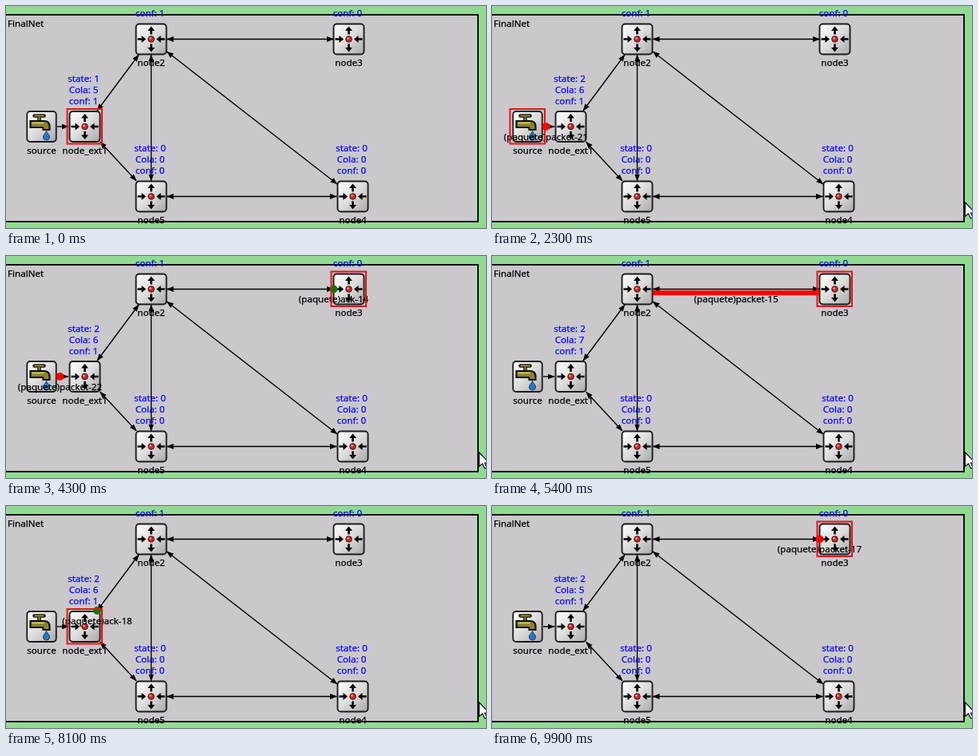
Recreate the animation shown at these times as an HTML page. Size 600 by 278 pixels, loop 10 s.

```html
<!DOCTYPE html>
<html lang="es">
<head>
<meta charset="utf-8">
<style>
  html, body { margin: 0; width: 100%; height: 100%; overflow: hidden; background: #92da92; }
  svg { display: block; width: 600px; height: 278px; }
  text { font: 11.6px "Noto Sans", "Open Sans", sans-serif; stroke: #000; stroke-width: .25; }
  .mid { text-anchor: middle; }
  .info { fill: #0a0aee; stroke: #0a0aee; }
  .wire { stroke: #000; stroke-width: 1.35; }
</style>
</head>
<body>
<svg viewBox="0 0 600 278">
  <defs>
    <linearGradient id="metal" x2="1" y2="1">
      <stop stop-color="#fff"/><stop offset=".5" stop-color="#dddcdc"/><stop offset="1" stop-color="#aaa8a8"/>
    </linearGradient>
    <marker id="tip" markerWidth="10" markerHeight="8" refX="8.5" refY="4" orient="auto-start-reverse" markerUnits="userSpaceOnUse">
      <path d="M0 .6L9 4L0 7.400z"/>
    </marker>
    <rect id="tile" x="-19" y="-19" width="38" height="38" rx="4" fill="url(#metal)" stroke="#1c1c1c" stroke-width="1.900"/>
    <g id="router">
      <use href="#tile"/>
      <path id="out" d="M-1.300 -6V-10.500H-4.500L0 -16L4.500 -10.500H1.300V-6z"/>
      <use href="#out" transform="scale(1 -1)"/>
      <path id="in" d="M-17 -1.300H-12V-4.500L-6.500 0L-12 4.500V1.300H-17z"/>
      <use href="#in" transform="scale(-1 1)"/>
      <circle r="3.800" fill="#c82828" stroke="#401010"/>
      <circle cx="-1" cy="-1" r="1.300" fill="#f5a0a0"/>
    </g>
    <g id="tap">
      <use href="#tile" transform="scale(.96 1)"/>
      <path d="M-9 -13.500H3M-3 -13V-6" stroke="#111" stroke-width="4.500" stroke-linecap="round"/>
      <path d="M-9 -13.500H3M-3 -12V-6" stroke="#9a9030" stroke-width="1.800"/>
      <path d="M-14 -7H3Q10 -7 10 0V4H2V2Q2 1 0 1H-14z" fill="#8d8428" stroke="#111" stroke-width="2.200"/>
      <path d="M-12 -4.500H3" stroke="#d8cf70" stroke-width="1.500"/>
      <path d="M6 5.500C7 9 10 10 10 13A4 4 0 0 1 2 13C2 10 5 9 6 5.500z" fill="#2878c8" stroke="#123c70"/>
    </g>
  </defs>
  <rect x="-4" y="11" width="594" height="259" fill="#cbc8cc" stroke="#111" stroke-width="2"/>
  <text x="2" y="26">FinalNet</text>
  <g id="net"></g>
  <g id="messages"></g>
  <rect id="focus" width="43.5" height="43.5" fill="none" stroke="#f01010" stroke-width="2"/>
  <path id="cursor" d="M591.500 246V263.500L595.500 260L598.500 266L601 265L598.500 259H604z" fill="#fff" stroke="#111" stroke-width="1.200"/>
</svg>
<script>
const $ = id => document.getElementById(id);

const nodes = {
  S: { x: 44.5, y: 151, name: 'source' },
  E: { x: 98.5, y: 151, name: 'node_ext1' },
  2: { x: 181.5, y: 41.5, name: 'node2', conf: 1 },
  3: { x: 428.5, y: 41.5, name: 'node3', conf: 0 },
  4: { x: 433.5, y: 238.5, name: 'node4', conf: 0 },
  5: { x: 181.5, y: 238.5, name: 'node5', conf: 0 },
};
const links = {
  SE: [64, 151, 78, 151],
  E2: [114, 131, 166, 61],
  E5: [117.5, 170, 163, 219],
  23: [201, 41.5, 409.5, 41.5],
  25: [181.5, 61, 181.5, 219],
  24: [201, 57, 414, 223],
  54: [201, 238.5, 413.5, 238.5],
};

// start tick (100 ms each), link, kind, number; acks run the link backwards
const legs = [
  [3, 'E2', 'packet', 16], [3, 'SE', 'packet', 20], [8, '23', 'ack', 13],
  [15, '23', 'packet', 14], [22, 'SE', 'packet', 21], [28, 'E2', 'ack', 16],
  [35, 'E2', 'packet', 17], [42, 'SE', 'packet', 22], [43, '23', 'ack', 14],
  [50, '23', 'packet', 15], [57, 'E2', 'ack', 17], [60, '23', 'ack', 15],
  [66, 'E2', 'packet', 18], [72, '23', 'packet', 16], [75, 'E2', 'ack', 18],
  [82, 'E2', 'packet', 19], [86, '23', 'ack', 16], [93, '23', 'packet', 17],
].map(([start, link, kind, id]) => {
  const back = kind === 'ack', [x1, y1, x2, y2] = links[link];
  return {
    start, link, kind, id,
    ends: back ? [x2, y2, x1, y1] : [x1, y1, x2, y2],
    from: link[back ? 1 : 0], to: link[back ? 0 : 1],
    length: link === 'SE' ? 5 : 7,
  };
});

const label = (x, y, s, extra = '') => `<text class="mid ${extra}" x="${x}" y="${y}">${s}</text>`;

function status({ x, y }, lines, id = '') {
  return `<g id="${id}">` + lines.map((s, i) =>
    label(x - 1.5, y - 28.5 - 14 * (lines.length - 1 - i), s, 'info')).join('') + '</g>';
}

function drawNet() {
  let out = '';
  for (const [key, n] of Object.entries(nodes)) {
    out += `<use href="#${key === 'S' ? 'tap' : 'router'}" x="${n.x}" y="${n.y}"/>` + label(n.x, n.y + 33.5, n.name);
    if (key === 'E') out += status(n, ['', '', ''], 'queue');
    else if (n.conf !== undefined)
      out += status(n, [...(n.y > 100 ? ['state: 0', 'Cola: 0'] : []), 'conf: ' + n.conf]);
  }
  for (const [key, [x1, y1, x2, y2]] of Object.entries(links))
    out += `<line class="wire" x1="${x1}" y1="${y1}" x2="${x2}" y2="${y2}" marker-end="url(#tip)"` +
      (key === 'SE' ? '/>' : ' marker-start="url(#tip)"/>');
  $('net').innerHTML = out;
}

function drawMessage({ ends: [x1, y1, x2, y2], kind, id, link }, age) {
  const color = kind === 'ack' ? '#0c780c' : '#f00';
  const dx = x2 - x1, dy = y2 - y1;
  const sending = link !== 'SE' && (age === 4 || age === 5);
  const p = sending ? 0.5 : Math.min(age / 4, 1);
  const x = x1 + dx * p, y = y1 + dy * p;
  let shape = `<circle cx="${x}" cy="${y}" r="5" fill="${color}"/>`;
  if (sending) {
    const k = 4.7 / Math.hypot(dx, dy), ox = -dy * k, oy = dx * k;
    shape = `<path d="M${x1 + ox} ${y1 + oy}l${dx} ${dy}" stroke="${color}" stroke-width="6"/>`;
  }
  return shape + label(x, y + 16.5, `(paquete)${kind}-${id}`);
}

function render(tick) {
  let state = 1, cola = 5, focus = tick ? '3' : 'E', out = '';
  for (const leg of legs) {
    const age = tick - leg.start;
    if (age < 0) continue;
    focus = age < 4 ? leg.from : leg.to;
    if (age < leg.length) out += drawMessage(leg, age);
    else if (leg.link === 'SE') cola++;
    else if (leg.link === 'E2') {
      if (leg.kind === 'ack') { cola--; state = 1; }
      else state = 2;
    }
  }
  $('messages').innerHTML = out;
  [`state: ${state}`, `Cola: ${cola}`, 'conf: 1'].forEach((s, i) => $('queue').children[i].textContent = s);
  $('focus').setAttribute('x', nodes[focus].x - 22);
  $('focus').setAttribute('y', nodes[focus].y - 22);
  $('cursor').style.display = tick < 3 ? 'none' : '';
}

drawNet();
const began = performance.now();
(function loop() {
  render(Math.floor((performance.now() - began) % 10000 / 100));
  requestAnimationFrame(loop);
})();
</script>
</body>
</html>
```
